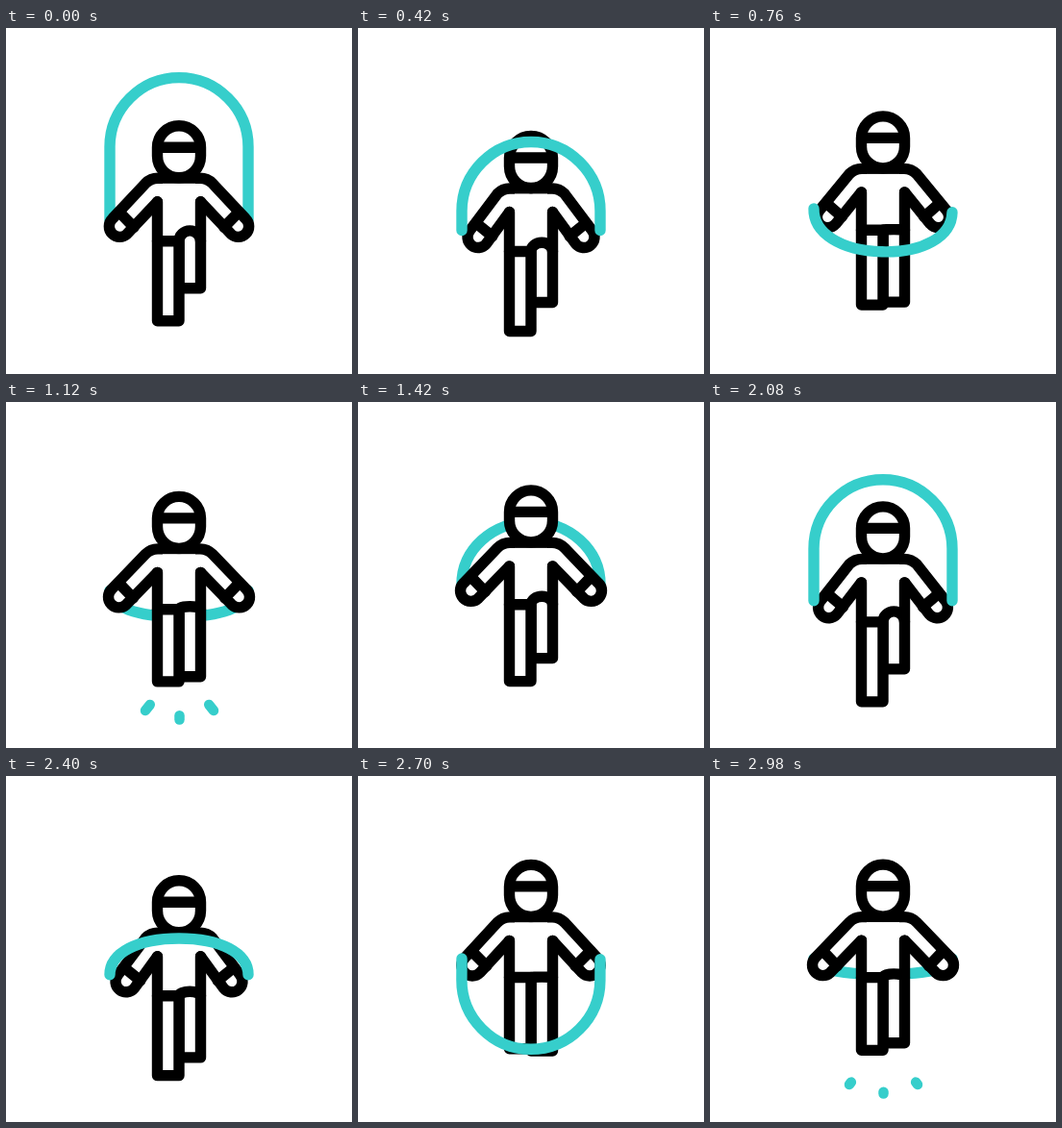
Write an HTML page with a canvas that moves like this. It is 360 px wide and 360 px high and loops after 3000 ms.

```html
<!DOCTYPE html>
<html lang="en">
<head>
<meta charset="utf-8">
<title>Rope skipping</title>
<style>
html, body { margin: 0; width: 100%; height: 100%; overflow: hidden; background: #fff; }
canvas { display: block; }
</style>
</head>
<body>
<canvas id="stage" width="360" height="360"></canvas>
<script>
const ctx = document.getElementById('stage').getContext('2d');
const LOOP = 3000, CYCLE = 1815;
const TEAL = '#36cecb', LINE = 11.4;

const clamp = x => Math.min(1, Math.max(0, x));
const wrap = t => (t % CYCLE + CYCLE) % CYCLE;

// Cosine easing through [time, value] keys that repeat every cycle.
function ease(t, ...keys) {
  for (let i = 0; i < keys.length; i++) {
    const [t0, from] = keys[i], [t1, to] = keys[(i + 1) % keys.length];
    const x = wrap(t - t0) / wrap(t1 - t0);
    if (x < 1) return from + (to - from) * (1 - Math.cos(Math.PI * x)) / 2;
  }
}

function draw(d, color = '#000', width = LINE, fill) {
  const path = new Path2D(d);
  if (fill) {
    ctx.fillStyle = fill;
    ctx.fill(path);
  }
  ctx.strokeStyle = color;
  ctx.lineWidth = width;
  ctx.stroke(path);
}

function drawRope(mid, end, angle) {
  const r = Math.min(72, Math.abs(mid - end));
  const dir = Math.sign(mid - end);
  const bend = mid - dir * r;
  // Shallow arcs are a little squarer than an ellipse.
  const k = 0.65 - 0.1 * r / 72;
  const side = bend + dir * r * k;
  ctx.save();
  ctx.translate(180, end);
  ctx.rotate(angle * Math.PI / 180);
  ctx.translate(-180, -end);
  draw(`M108 ${end}V${bend}C108 ${side} ${180 - 72 * k} ${mid} 180 ${mid}
    S252 ${side} 252 ${bend}V${end}`, TEAL, 11.4);
  ctx.restore();
}

function drawArm(inward) {
  const hx = 117.5 + 7.5 * inward, hy = 109.5 + 0.5 * inward;
  const len = Math.hypot(152.5 - hx, 76 - hy);
  const dx = (152.5 - hx) / len, dy = (76 - hy) / len;
  // Point `along` the arm from the hand and `out` to its outer side.
  const at = (along, out) => `${hx + dx * along + dy * out} ${hy + dy * along - dx * out}`;
  draw(`M157.5 84L${at(0, -11)}A11 11 0 0 1 ${at(0, 11)}L145 65Q150.5 59.5 158 59.5H180`,
    '#000', LINE, '#fff');
  draw(`M${at(10, -11)}L${at(10, 11)}`);
}

function drawBody(p, top) {
  const left = ease(p, [560, 208], [930, 196], [1760, 208]);
  const right = ease(p, [280, 174], [820, 199], [1700, 174]);
  const inward = ease(p, [420, 1], [600, 1], [1000, 0], [1700, 0]);
  const waist = 125 - (208 - left) * 0.25;
  const knee = (199.5 - right) * 0.43;
  ctx.save();
  ctx.translate(0, top);
  drawArm(inward);
  ctx.save();
  ctx.translate(360, 0);
  ctx.scale(-1, 1);
  drawArm(inward);
  ctx.restore();
  ctx.fillStyle = '#fff';
  ctx.fillRect(163, 65, 34, waist - 65);
  draw(`M180 ${waist}A11.25 ${knee} 0 0 1 202.5 ${waist}V${right}H180Z`, '#000', LINE, '#fff');
  draw(`M157.5 ${waist}H180V${left}H157.5Z`, '#000', LINE, '#fff');
  draw(`M157.5 84V${waist}M202.5 84V${waist}`);
  draw('M157.5 27.5A22.5 22.5 0 0 1 202.5 27.5V36.5A22.5 22.5 0 0 1 157.5 36.5ZH202.5',
    '#000', LINE, '#fff');
  ctx.restore();
}

function drawDashes(p) {
  const from = clamp((p - 1110) / 85), to = clamp((p - 1010) / 60);
  if (to === 0 || from === 1) return;
  for (const side of [-1, 0, 1]) {
    const x = 180.5 + 30 * side, y = side ? 314 : 325.5;
    const dx = 5.5 * side, dy = side ? 7 : 5;
    draw(`M${x + dx * from} ${y + dy * from}L${x + dx * to} ${y + dy * to}`, TEAL, 10.5);
  }
}

function render(t) {
  const p = wrap(t);
  const top = ease(p, [490, 108], [840, 84], [1010, 104], [1230, 83], [1760, 96.5]);
  // The rope falls in front, then rises behind.
  const fall = (p / 980) ** 1.6, rise = ((1930 - p) / 1050) ** 1.75;
  const ropeY = 46 + 280 * Math.max(0.02, Math.min(fall, rise));
  const tilt = ease(p, [585, 0], [760, 1.5], [935, 0]);
  const rope = () => drawRope(ropeY, top + 103, tilt);
  const inFront = p > 250 && fall < rise;
  ctx.fillStyle = '#fff';
  ctx.fillRect(0, 0, 360, 360);
  ctx.lineCap = ctx.lineJoin = 'round';
  if (!inFront) rope();
  drawBody(p, top);
  if (inFront) rope();
  drawDashes(p);
}

const start = performance.now();
function tick() {
  render((performance.now() - start) % LOOP);
  requestAnimationFrame(tick);
}
tick();
</script>
</body>
</html>
```
